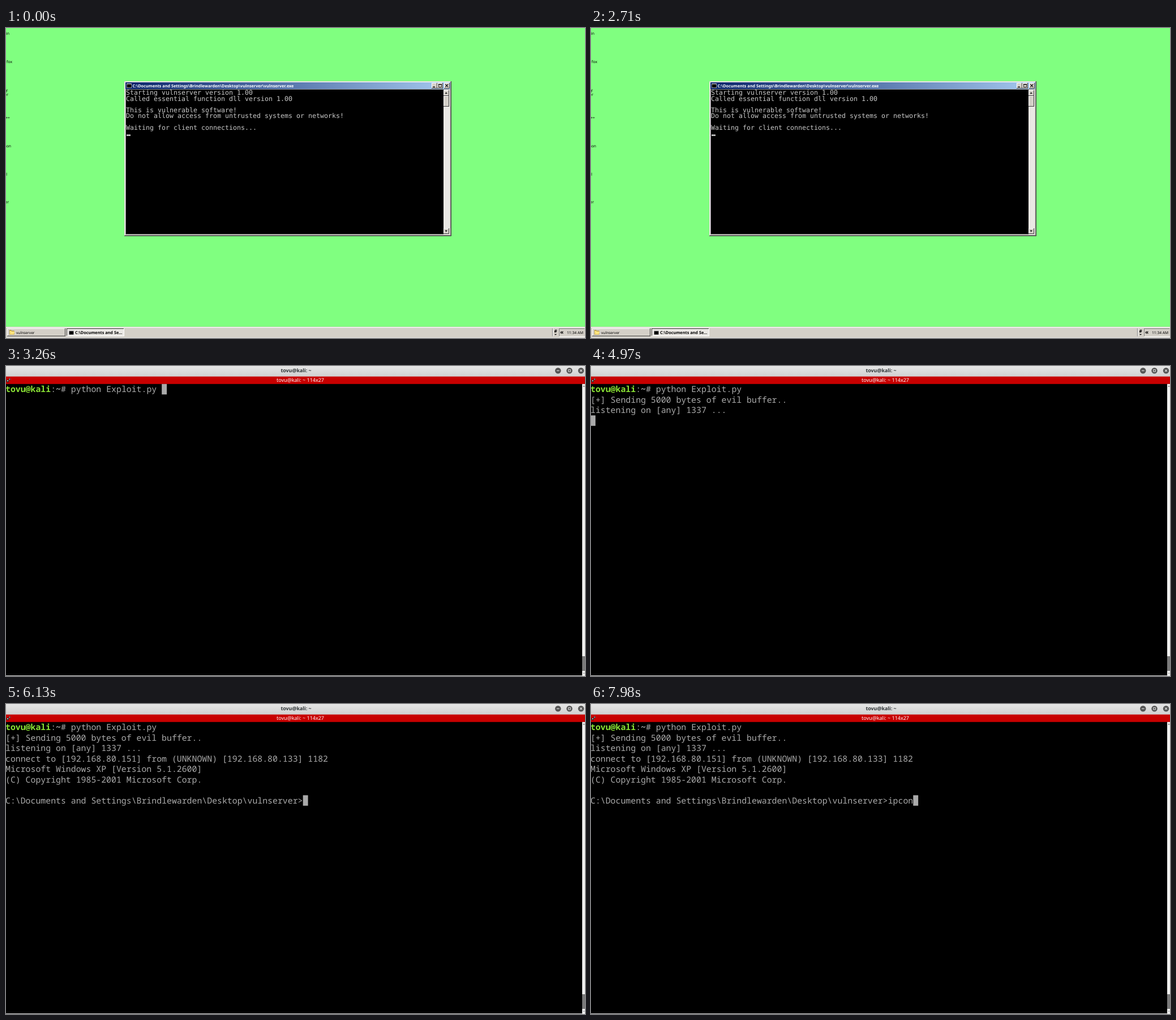
Recreate the animation shown at these times as an HTML page with a canvas. Size 1023 px wide and 548 px high, loop 8 s.

```html
<!DOCTYPE html>
<html lang="en">
<head>
<meta charset="utf-8">
<title>Terminal session</title>
<style>
html, body { margin: 0; width: 100%; height: 100%; overflow: hidden; background: #000; }
canvas { display: block; }
</style>
</head>
<body>
<canvas id="stage" width="1023" height="548"></canvas>
<script>
const ctx = document.getElementById('stage').getContext('2d');
const W = 1023, H = 548, LOOP = 8000;
const SANS = '"Noto Sans", "Open Sans", sans-serif';
const MONO = '"Noto Sans Mono", "DejaVu Sans Mono", monospace';
const CONSOLE = '"DejaVu Sans Mono", monospace';
const FACE = '#d4d0c8', LIGHT = '#ffffff', SHADE = '#808080', DARK = '#404040';
const ADMIN = 'Brindlewarden', USER = 'tovu';
const DIR = `C:\\Documents and Settings\\${ADMIN}\\Desktop\\vulnserver`;

function rect(x, y, w, h, fill) {
  ctx.fillStyle = fill;
  ctx.fillRect(x, y, w, h);
}

function text(str, x, y, font, fill, align = 'left') {
  ctx.font = font;
  ctx.textAlign = align;
  ctx.fillStyle = fill;
  ctx.fillText(str, x, y);
}

function line(points, stroke, width) {
  ctx.strokeStyle = stroke;
  ctx.lineWidth = width;
  ctx.beginPath();
  points.forEach(([x, y]) => ctx.lineTo(x, y));
  ctx.stroke();
}

function poly(points, fill) {
  ctx.fillStyle = fill;
  ctx.beginPath();
  points.forEach(([x, y]) => ctx.lineTo(x, y));
  ctx.fill();
}

function gradient(x0, y0, x1, y1, from, to) {
  const g = ctx.createLinearGradient(x0, y0, x1, y1);
  g.addColorStop(0, from);
  g.addColorStop(1, to);
  return g;
}

// Classic bevelled box, raised or pressed.
function bevel(x, y, w, h, fill = FACE, pressed = false) {
  rect(x, y, w, h, pressed ? LIGHT : DARK);
  rect(x, y, w - 1, h - 1, pressed ? DARK : LIGHT);
  rect(x + 1, y + 1, w - 2, h - 2, fill);
}

function arrow(x, y, dir, size, fill) {
  poly([[x - size, y - dir * size / 2], [x + size, y - dir * size / 2], [x, y + dir * size / 2]], fill);
}

function consoleIcon(x, y) {
  rect(x, y, 9, 8, '#c8c8c8');
  rect(x + 0.7, y + 1.4, 7.6, 5.9, '#000');
}

function desktop() {
  rect(0, 0, W, H, '#80ff80');
  const labels = [['in', 6, 12], ['fox', 11, 62], ['y', 3, 112], ['er', 4, 120],
    ['++', 7, 161], ['non', 9, 211], ['l', 2, 261], ['er', 5, 310]];
  for (const [str, x, y] of labels) text(str, x, y, `6.8px ${SANS}`, '#000', 'right');
}

function taskbar() {
  rect(0, 528, W, 20, FACE);
  rect(0, 529, W, 1, LIGHT);

  bevel(2, 531, 103, 14);
  poly([[6, 534], [9, 534], [10, 535.3], [14.5, 535.3], [14.5, 542], [6, 542]], '#a08020');
  poly([[6.6, 535], [9, 535], [9.8, 536.2], [14, 536.2], [15, 537.5], [14, 541.4], [6.6, 541.4]], '#ffe680');
  text('vulnserver', 18, 540.5, `6.6px ${SANS}`, '#000');

  bevel(107, 531, 102, 14, '#eae8e4', true);
  consoleIcon(111, 534.5);
  text('C:\\Documents and Se...', 122, 541, `bold 7.3px ${SANS}`, '#000');

  rect(965, 531, 1, 14, SHADE);
  rect(966, 531, 1, 14, LIGHT);
  ctx.strokeStyle = '#000';
  ctx.lineWidth = 0.8;
  ctx.strokeRect(970.4, 533.8, 2.4, 2.4);
  ctx.strokeRect(969.4, 535.4, 2.4, 2.4);
  arrow(971, 542, 1, 2, '#000');
  rect(977, 531, 45, 1, SHADE);
  rect(977, 531, 1, 14, SHADE);
  rect(977, 545, 46, 1, LIGHT);
  text('«', 979, 541, `bold 10px ${SANS}`, '#000');
  text('11:34 AM', 991, 541, `6.7px ${SANS}`, '#000');
}

function consoleWindow(cursorOn) {
  rect(209, 94, 578, 274, DARK);
  rect(209, 94, 577, 273, FACE);
  rect(210, 95, 576, 272, SHADE);
  rect(210, 95, 575, 271, LIGHT);
  rect(211, 96, 574, 270, FACE);
  rect(211, 96, 574, 12, gradient(211, 0, 785, 0, '#0a246a', '#a6caf0'));
  consoleIcon(213, 98);
  text(`${DIR}\\vulnserver.exe`, 223.5, 104.5, `bold 7.25px ${SANS}`, '#fff');

  for (const x of [752, 762, 774]) bevel(x, 97, 10, 10);
  rect(754, 103.6, 4, 1.4, '#000');
  ctx.strokeStyle = '#000';
  ctx.lineWidth = 0.8;
  ctx.strokeRect(764.4, 99.4, 5, 5);
  rect(764, 99, 5.8, 1.4, '#000');
  line([[776.3, 99.3], [781, 104.3]], '#000', 1.2);
  line([[781, 99.3], [776.3, 104.3]], '#000', 1.2);

  rect(211, 108, 573, 257, SHADE);
  rect(212, 109, 561, 255, '#000');
  rect(773, 109, 11, 256, '#eae8e4');
  for (const [y, h] of [[110, 10], [120, 19], [354, 10]]) bevel(773, y, 10, h);
  arrow(777.7, 114.8, -1, 2.3, '#000');
  arrow(777.7, 359, 1, 2.3, '#000');

  const lines = ['Starting vulnserver version 1.00', 'Called essential function dll version 1.00', '',
    'This is vulnerable software!', 'Do not allow access from untrusted systems or networks!', '',
    'Waiting for client connections...'];
  lines.forEach((s, i) => text(s, 212, 118.3 + i * 10.2, `11.63px ${CONSOLE}`, '#c8c8c8'));
  if (cursorOn) rect(213, 188.3, 7, 2.5, '#d0d0d0');
}

const COL = 8.91, ROW = 18.5, TOP = 32, GREY = '#aaaaaa';
const cellX = col => col * COL - 1;

function put(str, col, row, fill = GREY, weight = '') {
  text(str, cellX(col), TOP + row * ROW + 14.3, `${weight} ${COL / 0.6}px ${MONO}`, fill);
}

function frameButton(x, glyph) {
  ctx.fillStyle = '#555';
  ctx.beginPath();
  ctx.arc(x, 8.2, 5.2, 0, Math.PI * 2);
  ctx.fill();
  if (glyph === 'min') rect(x - 2.3, 7.7, 4.6, 1.1, '#e4e4e4');
  if (glyph === 'max') {
    ctx.strokeStyle = '#e4e4e4';
    ctx.lineWidth = 1;
    ctx.strokeRect(x - 1.8, 6.4, 3.6, 3.6);
  }
  if (glyph === 'close') {
    line([[x - 1.9, 6.3], [x + 1.9, 10.1]], '#e4e4e4', 1.1);
    line([[x + 1.9, 6.3], [x - 1.9, 10.1]], '#e4e4e4', 1.1);
  }
}

function terminalFrame() {
  rect(0, 0, W, H, '#000');
  rect(0, 0, W, 19, gradient(0, 0, 0, 19, '#e6e6e6', '#d0d0d0'));
  text(`${USER}@kali: ~`, 512.5, 11.3, `bold 8.9px ${SANS}`, '#2e3436', 'center');
  frameButton(975.3, 'min');
  frameButton(995.5, 'max');
  frameButton(1016, 'close');

  rect(0, 18.6, W, 13.2, '#c80000');
  text(`${USER}@kali: ~ 114x27`, 520, 28, `9px ${SANS}`, '#fff', 'center');
  rect(1, 24.5, 4, 4, '#222');
  rect(5, 22, 3, 3, '#222');
  rect(2, 25.3, 2, 1.6, '#ddd');
  rect(5.6, 22.6, 1.7, 1.5, '#ddd');

  rect(1018, 31.8, 5, 515.2, '#f0f0ef');
  rect(1018, 513, 5, 26, '#7a7a7a');
  arrow(1021, 35.5, -1, 1.8, '#666');
  arrow(1021, 543.5, 1, 1.8, '#999');
}

const SENT = ['[+] Sending 5000 bytes of evil buffer..', 'listening on [any] 1337 ...'];
const SHELL = ['connect to [192.168.80.151] from (UNKNOWN) [192.168.80.133] 1182',
  'Microsoft Windows XP [Version 5.1.2600]', '(C) Copyright 1985-2001 Microsoft Corp.', '', DIR + '>'];
const KEYS = [7445, 7520, 7680, 7830, 7980];

function terminal(t) {
  terminalFrame();
  put(`${USER}@kali`, 0, 0, '#8ae234', 'bold');
  put(':', 9, 0);
  put('~', 10, 0, '#b8b8b8', 'bold');
  put('# python Exploit.py', 11, 0);

  let col = 31, row = 0, cursorOn = true;
  if (t >= 4970) {
    SENT.forEach((s, i) => put(s, 0, 1 + i));
    col = 0;
    row = 3;
  }
  if (t >= 5500) {
    SHELL.forEach((s, i) => put(s, 0, 3 + i));
    const typed = 'ipcon'.slice(0, KEYS.filter(k => t >= k).length);
    row = 7;
    col = SHELL[4].length;
    put(typed, col, row);
    col += typed.length;
    cursorOn = t < 5580 || (t >= 6130 && t < 6740) || t >= 7370;
  }
  if (cursorOn) rect(cellX(col), TOP + row * ROW - 0.2, COL, ROW, GREY);
}

const BLINKS = [70, 530, 1080, 1630, 2180, 2710];

function draw(t) {
  if (t < 3190) {
    desktop();
    consoleWindow(BLINKS.filter(b => t >= b).length % 2 === 0);
    taskbar();
  } else if (t < 3260) {
    rect(0, 0, W, H, '#000');
  } else {
    terminal(t);
  }
  rect(0, 547, W, 1, '#e0e0e0');
}

ctx.textRendering = 'geometricPrecision';
const start = performance.now();
function tick() {
  draw((performance.now() - start) % LOOP);
  requestAnimationFrame(tick);
}
tick();
</script>
</body>
</html>
```
